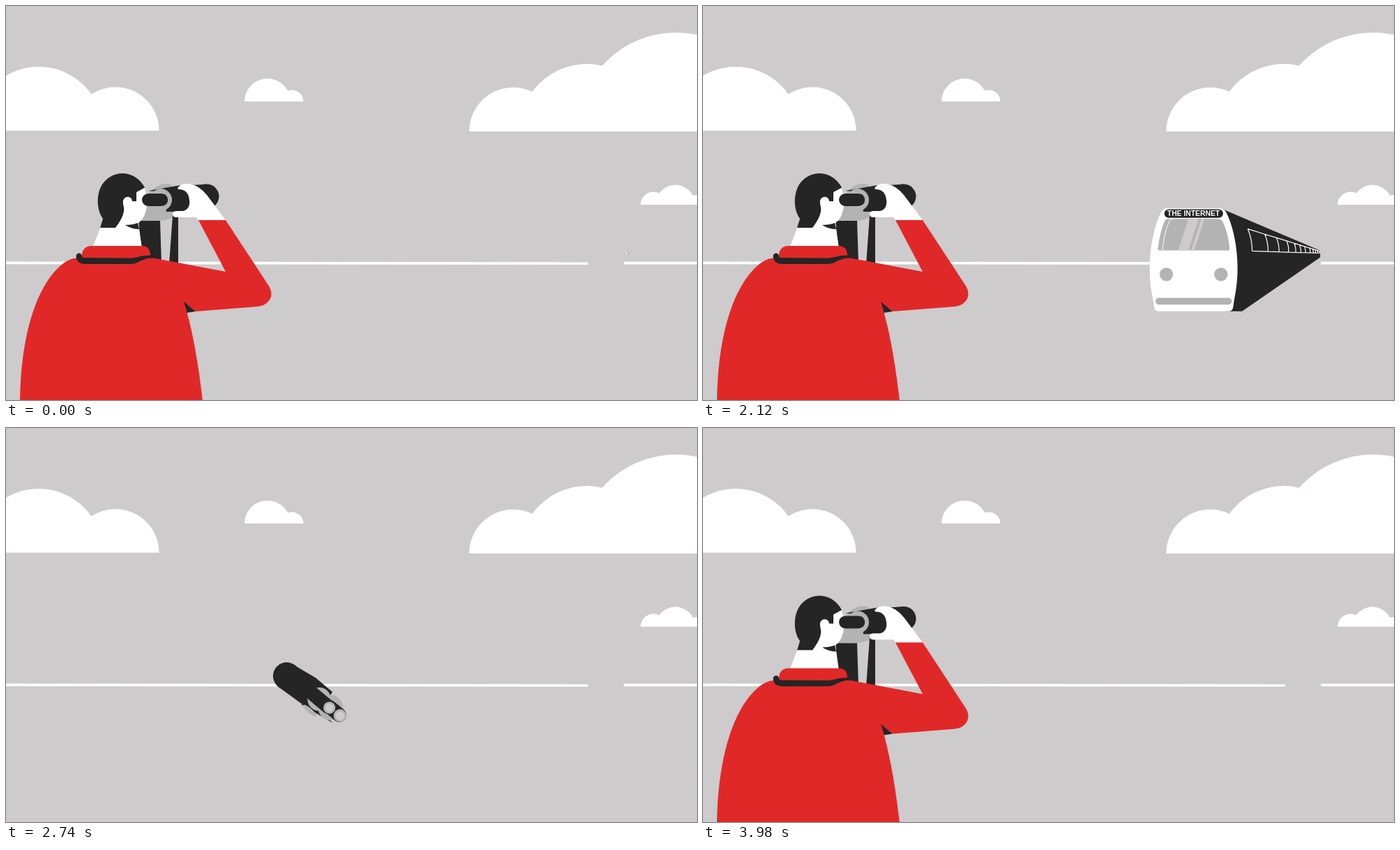
Recreate the animation shown at these times as an HTML page. Size 991x565 px, loop 4.02 s.

```html
<!DOCTYPE html>
<html lang="en">
<head>
<meta charset="utf-8">
<title>Lookout and train</title>
<style>
  html, body { margin: 0; width: 100%; height: 100%; overflow: hidden; background: #cdcbcc; }
  svg { display: block; width: 100%; height: 100%; }
  .w { fill: #fff; }
  .k { fill: #252525; }
  .r { fill: #e12828; }
  .g { fill: #b3b3b3; }
  .bg { fill: #cdcbcc; }
  .ring { fill: none; stroke: #b3b3b3; stroke-width: 6; }
  .horizon { stroke: #fff; stroke-width: 3.6; }
  #panes { fill: none; stroke: #fff; vector-effect: non-scaling-stroke; }
  #sign { font: bold 36.5px "Liberation Sans", Arial, sans-serif; fill: #fff; text-anchor: middle; }
</style>
</head>
<body>
<svg viewBox="0 0 991 565">
  <rect class="bg" width="991" height="565"/>
  <path id="clouds" class="w"/>
  <g class="horizon">
    <path d="M-5,368.4 L833.5,369.2" stroke-linecap="round"/>
    <path d="M886,368.6 H996"/>
  </g>

  <g id="train">
    <path class="k" d="M364,129 Q374,131 381,136.5 L860.9,340.2 C862,340.8 862.9,350 862.9,361 L862.6,376 L468,648 H380Z"/>
    <path id="panes"/>
    <path class="w" d="M82,128 H364 Q382,130 398,170 C428,240 445,340 445,430 C445,500 436,550 430,580 L422,630 Q418,648 400,648 H46 Q28,648 24,630 L16,580 C10,550 1,500 1,430 C1,340 18,240 48,170 Q64,130 82,128Z"/>
    <rect class="k" x="75" y="132.500" width="297" height="43.500" rx="21.700"/>
    <text id="sign" x="222.500" y="167">THE INTERNET</text>
    <path class="g" d="M42,334 Q53,245 76,192 Q81,181 94,181 H345 Q362,181 371,197 C391,240 402,290 405,333 Q405,340 398,340 H48 Q42,340 42,334Z"/>
    <path class="bg" d="M197,181 H248 L197,340 H145Z M262,181 H278 L226,340 H210Z"/>
    <path d="M66,340 C70,285 83,225 102,192 Q109,181 120,180" fill="none" stroke="#fff" stroke-width="3.500"/>
    <circle class="g" cx="361" cy="461.500" r="34"/>
    <circle class="g" cx="85" cy="461.500" r="34"/>
    <rect class="g" x="30" y="580" width="386" height="34" rx="17"/>
  </g>
  <path id="dust" class="w"/>

  <g id="man">
    <path id="palm" class="g" d="M-14,-13 C12,-33 47,-35 57,-18 Q60,-10 52,-11 C37,-20 25,-10 24,-2 L37,17 Q34,23 29,21 L14,13Z"/>
    <path id="sleeve" class="k"/>
    <path id="strap" class="k"/>
    <g id="head">
      <path class="w" d="M198,260 C206,280 202,303 190,311 L191,320 L195,347 H124 L136,316 L150,270 L187,262Z"/>
      <path class="k" d="M171,314 Q182,314 189,311 L191,320 Q180,320 171,314Z"/>
      <path class="k" d="M135,318 L139,305 C128,290 130,264 141,252 C157,234 186,236 199,260.500 L187,267 V280 H181 C180,272 170,272 168,279 C167,284 170,288 169,294 C168,302 163,310 157,318Z"/>
    </g>
    <path id="torso" class="r"/>
    <g id="collar">
      <path class="r" d="M109,364 V355 Q111,345 121,344 H196 Q207,345 207,358 L190,366Z"/>
      <path class="k" d="M100.500,359 Q101,354 106,354.500 Q109,356 110,361 L180,361.500 Q190,360 197,358 L208,357.500 Q213,359 211,361 L205,361.500 Q195,364 190,367 Q186,370 178,370 H112 Q101,369 100.500,359Z"/>
    </g>
    <g id="grip">
      <circle id="farRing" class="ring" r="13"/>
      <path class="k" d="M-46,-13 L0,-21 V-10Z M-24,-15 L0,-20 L38,-22.500 V12 L8,17 H-20Z"/>
      <circle class="k" cx="38" cy="-5" r="17.500"/>
      <g id="tube">
        <circle class="ring" r="13"/>
        <rect id="pill" class="k" x="-55" y="-9" height="18" rx="9"/>
        <ellipse id="lens" class="bg" cx="-47" ry="7" stroke="#b3b3b3" stroke-width="2.500"/>
      </g>
      <g id="twin">
        <circle class="ring" cx="-13" cy="-1" r="12"/>
        <rect class="k" x="-38" y="-10" width="44" height="18" rx="9"/>
        <circle class="bg" cx="-30" cy="-1" r="6.500" stroke="#b3b3b3" stroke-width="2.500"/>
        <ellipse class="g" cx="-13" cy="-20" rx="11" ry="3"/>
      </g>
      <path id="hand" class="w" d="M-3,-18 Q2,-24 12,-23 C25,-21 32,-14 38,-7 L65,29 L72,40 H42 L26,29 L23,25 H-6 Q-11,25 -11,20 Q-11,16 -5,16 H4 C12,14 14,7 13,0 C12,-10 7,-15 -2,-15 Q-5,-16 -3,-18Z"/>
    </g>
    <path id="arm" class="r"/>
  </g>
</svg>

<script>
const LOOP = 4020;
const VX = 894, VY = 354.5;          // vanishing point
const el = {};
document.querySelectorAll('[id]').forEach(e => el[e.id] = e);

const clamp = u => Math.max(0, Math.min(1, u));
const span = (t, a, b) => clamp((t - a) / (b - a));
const smooth = u => u * u * (3 - 2 * u);
const lerp = (a, b, u) => a + (b - a) * u;
const set = (id, name, value) => el[id].setAttribute(name, value);
const show = (id, on) => el[id].style.display = on ? '' : 'none';
const place = (id, [x, y, rot = 0, size = 1]) =>
  set(id, 'transform', `translate(${x} ${y}) rotate(${rot}) scale(${size})`);
const zoom = (id, s) =>
  set(id, 'transform', `translate(${VX} ${VY}) scale(${s}) translate(${-VX} ${-VY})`);

// Blends numbers, number lists, or two paths with the same commands.
const NUM = /-?\d+(\.\d+)?/g;
function mix(a, b, u) {
  if (typeof a === 'number') return lerp(a, b, u);
  if (Array.isArray(a)) return a.map((n, i) => lerp(n, b[i], u));
  const to = b.match(NUM);
  let i = 0;
  return a.replace(NUM, n => lerp(+n, +to[i++], u).toFixed(2));
}

const looking = {
  torso: 'M20,566 C21,470 45,395 85,367 Q95,361 105,361 L205,361 C228,366 240,383 255,424 C268,465 276,515 282,566 V720 H20Z',
  arm: 'M209,361 L315,381 L276,307 L315,307 L376,400 C387,416 376,430 361,431 L272,438 L255,424Z',
  sleeve: 'M190,308 L221,308 L223,370 L196,370Z M254,422 L272,438 L259,440Z',
  strap: 'M239,300 L247,303 L247,372 L234,370Z',
  palm: [206, 308, -44, 1],
  grip: [250, 278, 0, 1],
  head: [0, 0],
  collar: [0, 0, 0],
  open: 0
};
const lowered = {
  ...looking,
  arm: 'M209,361 L250,497 L363,433 L366,472 L280,530 C265,540 245,540 235,520 L238,450 L238,424Z',
  sleeve: 'M275,410 L302,436 L272,472 L235,442Z M230,422 L240,438 L235,440Z',
  strap: 'M200,400 L205,400 L205,420 L200,420Z',
  palm: [288, 423, 0, 1],
  grip: [388, 388, 83, 1.1],
  open: 1
};
const shoved = {
  torso: 'M-140,566 C-140,480 -110,420 -70,388 Q-60,380 -50,378 L45,357 C62,358 80,366 139,461 C155,497 168,530 180,566 V720 H-140Z',
  arm: 'M75,366 L172,413 L202,333 L232,348 L210,452 C207,465 197,470 182,469 L139,461 L139,461Z',
  sleeve: 'M-60,420 L-30,420 L-30,480 L-60,480Z M60,440 L70,450 L60,450Z',
  strap: 'M24,303 L33,306 L38,342 L28,342Z',
  palm: [-60, 440, -44, 1],
  grip: [199, 272, 45, 1.12],
  head: [-168, 10],
  collar: [-160, -5, -14],
  open: 1
};

const dustNear = 'M665,513 C690,465 710,430 725,413 Q738,402 749,402 C760,402 766,412 773,412.5 C780,411 785,394 800,394 Q811,395 815,407Z';
const dustFar = 'M300,764 C325,645 362,543 408,512 Q425,495 447,495 C500,495 530,535 568,535 C610,535 625,478 653,478 Q668,480 666,513Z';

// Clouds are half discs: x, base, radius.
set('clouds', 'd', [
  [47, 178.7, 91.7], [157, 178.7, 62.5], [375, 137, 33], [410, 137, 16.5],
  [727.5, 180, 63.2], [833, 180, 97], [961, 180, 142],
  [928.5, 285, 18.5], [960, 285, 28.5], [991, 285, 14]
].map(([x, y, r]) => `M${x - r},${y} a${r},${r} 0 0 1 ${2 * r},0Z`).join(''));

// Window bars shrink toward the vanishing point and grow steeper on the way.
const bars = [397, 311, 252, 200, 162, 135, 110, 85, 69, 56.7, 44.9, 34.9].map(b => {
  const f = b / 397, lean = f ** 1.12;
  const x = VX - b, y = VY - 122.8 * f;
  return { top: [x, y], foot: [x + 22 * lean, VY - 11 * lean], bend: [x + 22 * lean, lerp(y, VY, .42)] };
});
set('panes', 'd', `M${bars.map(b => b.top).join(' L')} M${bars.map(b => b.foot).join(' L')}` +
  bars.map(b => `M${b.top} Q${b.bend} ${b.foot}`).join(''));

const approach = [[0, .005], [200, .005], [760, .009], [1320, .0225], [1880, .0805]];
function trainSize(t) {
  if (t >= 2420) return 15.6 ** ((t - 2420) / 200);
  if (t >= 1880) return .0805 ** (1 - span(t, 1880, 2360));
  const i = approach.findIndex(p => p[0] > t);
  const [a, b] = [approach[i - 1], approach[i]];
  return lerp(a[1], b[1], span(t, a[0], b[0]));
}

function drawTrain(t) {
  const on = t < 2800;
  show('train', on);
  if (on) {
    const s = trainSize(t);
    zoom('train', s);
    el.panes.style.strokeWidth = Math.min(1.2, .3 + s * 6);
  }
  const dusty = t > 2120 && t < 2900;
  show('dust', dusty);
  if (dusty) {
    set('dust', 'd', mix(dustNear, dustFar, span(t, 2420, 2620)));
    zoom('dust', t < 2620 ? span(t, 2120, 2360) ** 2 : 3 ** ((t - 2620) / 200));
  }
}

function poseAt(t) {
  if (t < 3000) return mixPose(looking, shoved, span(t, 2120, 2360) ** 2);
  return mixPose(lowered, looking, smooth(span(t, 3660, 3900)));
}
function mixPose(a, b, u) {
  const p = {};
  for (const key in a) p[key] = mix(a[key], b[key], u);
  return p;
}

// The binoculars spin loose, then drop out of the picture.
function flight(t) {
  const u = span(t, 2420, 2620), v = span(t, 2620, 2940);
  return [
    lerp(199, 405, u) + 90 * v,
    lerp(272, 314, u) - 50 * Math.sin(Math.PI * u) + 60 * v + 300 * v * v,
    lerp(45, -95, u) - 120 * v,
    1.12
  ];
}

function drawMan(t) {
  const flying = t > 2420 && t < 2940;
  const on = t < 2940 || t >= 3420;
  show('man', on);
  if (!on) return;
  const p = poseAt(t);
  const dx = t < 3000 ? -400 * span(t, 2420, 2580) : 0;
  const dy = t < 3000 ? 0 : 324 * (1 - span(t, 3380, 3995)) ** 1.75;
  place('man', [dx, dy]);
  for (const id of ['torso', 'arm', 'sleeve', 'strap']) set(id, 'd', p[id]);
  place('palm', p.palm);
  place('head', p.head);
  const [cx, cy, rot] = p.collar;
  set('collar', 'transform', `translate(${cx} ${cy}) rotate(${rot} 207 353)`);

  const grip = flying ? flight(t) : p.grip;
  place('grip', [grip[0] - (flying ? dx : 0), ...grip.slice(1)]);
  const slide = flying ? span(t, 2420, 2620) : 0;
  const ringX = -28 + 12 * p.open - 15 * slide;
  el.tube.firstElementChild.setAttribute('cx', ringX);
  set('pill', 'width', ringX + 65);
  set('lens', 'rx', 7 * p.open);
  show('lens', p.open > .05);
  set('farRing', 'cx', ringX - 2 * p.open);
  set('farRing', 'cy', -10 * p.open);
  show('farRing', !flying);
  show('twin', flying && t >= 2500);
  show('hand', !flying);
}

// Poses advance in 40 ms steps, with one longer hold before the pass.
function snap(t) {
  if (t < 2360) return Math.floor(t / 40) * 40;
  if (t < 2460) return 2360;
  return 2460 + Math.floor((t - 2460) / 40) * 40;
}

const start = performance.now();
function tick() {
  const t = snap((performance.now() - start) % LOOP);
  drawTrain(t);
  drawMan(t);
  requestAnimationFrame(tick);
}
tick();
</script>
</body>
</html>
```
